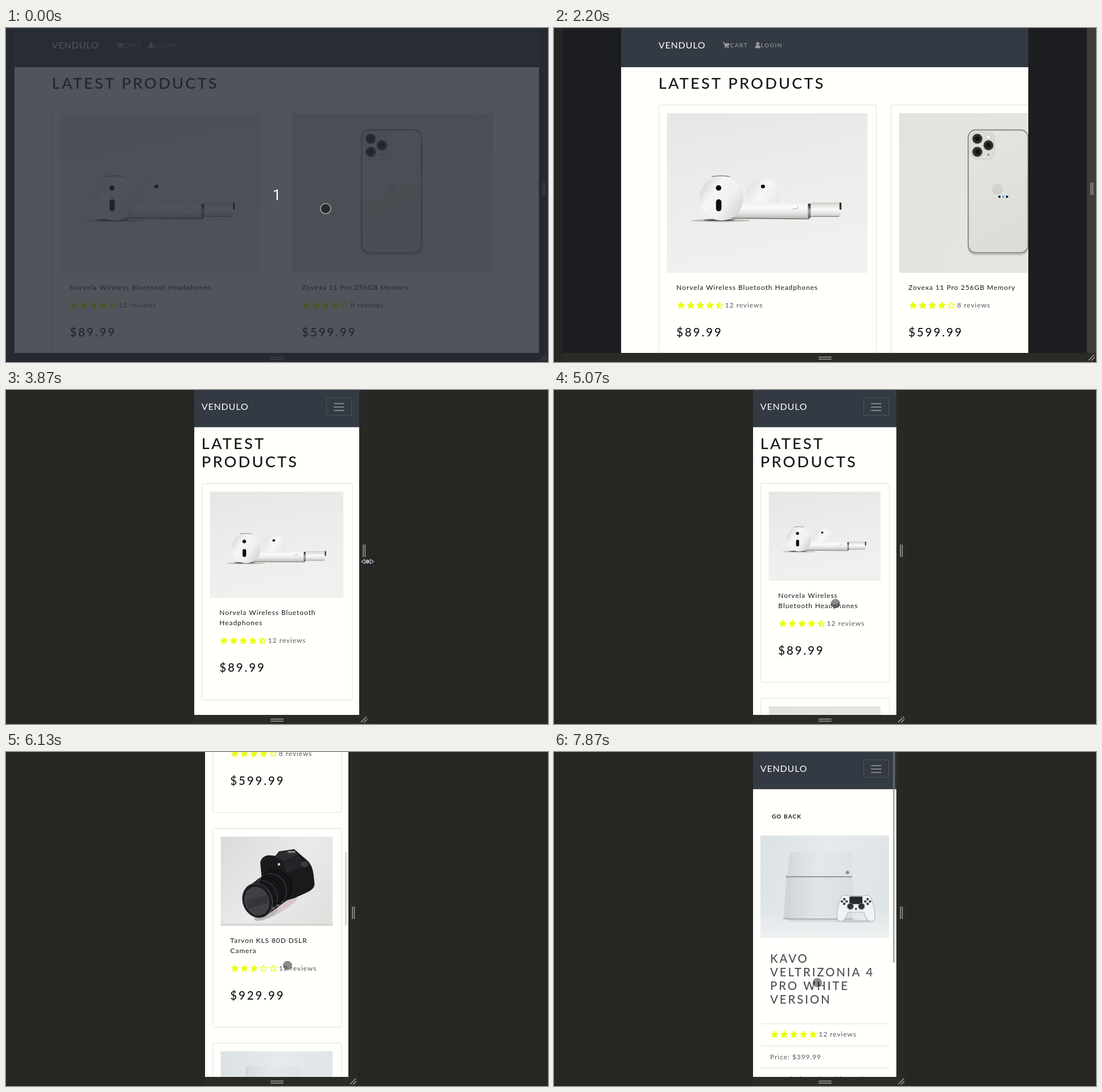
Animation of 953x588 px, one loop 8 s. Source, as an HTML page with a canvas:

```html
<!DOCTYPE html>
<html lang="en">
<head>
<meta charset="utf-8">
<title>Responsive shop</title>
<style>
  html, body { margin: 0; width: 100%; height: 100%; overflow: hidden; background: #262722; }
  canvas { display: block; }
</style>
</head>
<body>
<canvas id="stage" width="953" height="588"></canvas>
<script>
const ctx = document.getElementById('stage').getContext('2d');
const LOOP = 8000, MID = 476, BOTTOM = 572;
const INK = '#161616', GREY = '#55585a', STAR = '#ebff0a', LINE = '#dfdfdc', PAPER = '#fffffc';

// name: weight, size, letter spacing
const styles = {
  h1: [500, 27.2, 3.2], h3: [500, 20.4, 2.9], body: [400, 12, .93],
  brand: [400, 16, .85], link: [500, 10, 1.5], button: [700, 10, 1.1]
};
// title, rating, reviews, price, picture
const products = [
  ['Norvela Wireless Bluetooth Headphones', 4.5, 12, '$89.99', earbuds],
  ['Zovexa 11 Pro 256GB Memory', 4, 8, '$599.99', phone],
  ['Tarvon KLS 80D DSLR Camera', 3, 12, '$929.99', camera],
  ['Kavo Veltrizonia 4 Pro White Version', 5, 12, '$399.99', gameBox],
  ['', 5, 10, '', dusk]
];
// time, visible width, width between handles, layout width
const widths = [
  [0, 922], [2070, 850, 922], [2200, 716, 922], [2330, 610, 716], [2530, 582, 610],
  [2670, 556, 582], [2730, 530, 556], [2870, 490, 530], [3000, 433, 490],
  [3070, 422, 422, 433], [3200, 398, 422], [3270, 372, 422, 398], [3330, 350, 422, 372],
  [3470, 322, 422, 350], [3530, 322], [3670, 308], [3800, 290], [3930, 270],
  [4070, 258], [4130, 254], [4400, 252]
];
const pointer = [
  [0, 562, 318], [200, 562, 318], [730, 759, 331], [1130, 916, 300], [1530, 944, 302],
  [1980, 944, 302], [2200, 790, 297], [2530, 756, 299], [3070, 673, 301], [3670, 654, 302],
  [4130, 612, 302], [4530, 612, 302], [4930, 495, 376], [7150, 495, 376], [7400, 485, 378],
  [7760, 485, 378], [7870, 463, 406]
];
const thumbFade = [[0, 0], [5080, 0], [5150, 1], [5800, 1], [5950, 0], [6070, 0], [6190, 1], [7170, 1], [7400, 0]];

const clamp = x => Math.max(0, Math.min(1, x));
const glide = x => 1 - (1 - x) ** 3 * (1 + 3 * x);
const scrollAt = t => Math.round(757.6 * glide(clamp((t - 5070) / 800)) + 378.9 * glide(clamp((t - 6050) / 670)));

function track(keys, t) {
  const i = keys.findLastIndex(k => k[0] <= t), a = keys[i], b = keys[i + 1] || a;
  const u = a === b ? 0 : (t - a[0]) / (b[0] - a[0]);
  return a.map((v, j) => v + (b[j] - v) * u).slice(1);
}

// --- drawing helpers ---
function paint(fill, stroke, width = 1) {
  if (fill) { ctx.fillStyle = fill; ctx.fill(); }
  if (stroke) { ctx.strokeStyle = stroke; ctx.lineWidth = width; ctx.stroke(); }
}
function box(x, y, w, h, fill, r = 0, stroke, width) {
  ctx.beginPath();
  ctx.roundRect(x, y, w, h, r);
  paint(fill, stroke, width);
}
function oval(x, y, rx, ry, fill, stroke, width, turn = 0) {
  ctx.beginPath();
  ctx.ellipse(x, y, rx, ry, turn, 0, 7);
  paint(fill, stroke, width);
}
function shape(d, fill, stroke, width) {
  const p = new Path2D(d);
  if (fill) { ctx.fillStyle = fill; ctx.fill(p); }
  if (stroke) { ctx.strokeStyle = stroke; ctx.lineWidth = width; ctx.stroke(p); }
}
function fade(x0, y0, x1, y1, ...colors) {
  const g = ctx.createLinearGradient(x0, y0, x1, y1);
  colors.forEach((c, i) => g.addColorStop(i / (colors.length - 1), c));
  return g;
}
function setStyle(name) {
  const [weight, size, gap] = styles[name];
  ctx.font = `${weight} ${size}px Lato, "Open Sans", sans-serif`;
  ctx.letterSpacing = gap + 'px';
  return size;
}
function text(str, x, y, style, color) {
  const size = setStyle(style);
  ctx.fillStyle = color;
  ctx.fillText(str, x, y + size * .36);
}
function wrap(str, max, style) {
  setStyle(style);
  const lines = [];
  for (const word of str.split(' ')) {
    const last = lines.at(-1), joined = last + ' ' + word;
    if (lines.length && ctx.measureText(joined).width <= max) lines[lines.length - 1] = joined;
    else lines.push(word);
  }
  return lines;
}

// --- product pictures ---
function earbuds() {
  box(0, 0, 353, 281, fade(0, 0, 60, 281, '#e6e7e5', '#ecedeb', '#f0f0ee'));
  oval(95, 189, 52, 2.5, '#bdbdba');
  oval(92, 188, 28, 2, '#5a5a58');
  ctx.save();
  ctx.beginPath();
  ctx.rect(130, 100, 80, 59);
  ctx.clip();
  oval(169, 145, 30.5, 30, fade(140, 120, 200, 160, '#dededc', '#f8f8f7', '#e4e4e2'));
  ctx.restore();
  oval(169, 129, 3.6, 3.2, '#111');
  shape('M105 157L250 159V185.500L112 184.500Z', fade(0, 157, 0, 186, '#f1f1f0', '#fafaf9', '#e2e2e0', '#b5b5b2'));
  shape('M112 185L250 186', null, '#6c6c6a', 1.4);
  box(253, 157, 53, 24, fade(0, 157, 0, 181, '#cfcfcc', '#fbfbfa', '#d2d2cf'), 3);
  shape('M253 181.500H303', null, '#777774', 1.2);
  box(248, 159, 5, 26, fade(0, 159, 0, 185, '#222', '#aaa', '#555'), 2);
  box(303.500, 157, 3.500, 13, '#33342f', 2);
  shape('M221 168H230V164', null, '#aaaaa8', 1);
  oval(96, 150, 38.500, 39, fade(58, 120, 134, 172, '#cfcfcd', '#f5f5f4', '#f0f0ef', '#d2d2d0'));
  shape('M79 111.500Q95 109 111 111.500', null, '#8a8a87', 1.6);
  oval(91, 131.500, 4.800, 4.800, '#0e0e0e');
  box(86.500, 151.500, 9.500, 21, '#0e0e0e', 4.700);
}
function phone() {
  box(0, 0, 353, 281, fade(0, 0, 353, 281, '#e2e3df', '#e6e7e3'));
  box(121, 32, 107, 218, '#c3c4bd', 14);
  box(227, 63, 2, 38, '#8b8c84', 1);
  box(122, 29.500, 105, 216, fade(122, 30, 227, 245, '#e4e5e0', '#dbdcd5'), 13, '#85867e', 1.8);
  box(126, 33, 42, 48, '#dcddd7', 11, '#cbccc5', 1);
  oval(173, 134, 10, 10, '#d3d4ce');
  for (const [x, y] of [[138, 45], [157.500, 56.500], [138, 68]]) {
    oval(x, y, 9, 9, '#2b2d2c', '#a7a8a1', 1.2);
    oval(x, y, 4, 4, '#101212');
  }
  oval(157.500, 42, 4, 4, '#f2f2ee', '#b9bab4', 1);
  oval(157.500, 73, 1.600, 1.600, '#65665f');
}
function camera() {
  ctx.scale(353 / 198, 353 / 198);
  box(0, 0, 198, 158, fade(0, 0, 198, 158, '#d9dad9', '#e9eaea', '#dfe0dd'));
  oval(98, 128, 42, 9, '#d6c6cc', null, 0, -.5);
  oval(80, 138, 22, 7, '#bcb4b7', null, 0, -.4);
  box(0, 154, 198, 4, '#d5d6d1');
  shape('M70 46Q72 35 84 33L97 34L103 26L130 22L140 31L153 42Q162 50 164 66L166 84Q166 93 152 99L130 109L104 116L74 88Z', '#191a1c');
  shape('M97 36L104 27L129 24L137 32L112 44Z', '#2c2d30');
  shape('M108 46L138 34L147 50L118 66Z', '#232427');
  box(118, 25, 14, 4, '#77797c', 1);
  oval(148, 49, 7, 5, '#3a3b3e');
  box(101, 47, 4, 4, '#d8d8d8');
  ctx.lineCap = 'round';
  shape('M68 110L101 87', null, '#151618', 55);
  ctx.lineCap = 'butt';
  for (let i = 0; i < 4; i++) oval(74 + i * 8, 107 - i * 6, 26, 30, null, i % 2 ? '#0c0d0e' : '#35363a', 1.6, -.35);
  oval(65, 113, 26, 31, '#1c1d1f', '#5b5c5f', 1, -.35);
  oval(64, 114, 21.500, 26, '#404145', null, 0, -.35);
  shape('M46 112L82 103L84 117L49 128Z', '#35363a');
}
function gameBox() {
  ctx.scale(353 / 198, 353 / 198);
  box(0, 0, 198, 158, fade(0, 0, 198, 60, '#dbe1e4', '#e6eaec', '#dfe4e7'));
  box(0, 117, 198, 41, fade(0, 117, 0, 158, '#e1e6e8', '#eef1f2'));
  shape('M36 128L148 129L156 133L48 133Z', '#d4d9dc');
  shape('M45 26H142V63H40Z', fade(40, 0, 142, 0, '#d5dadd', '#e4e8ea', '#dde2e4'));
  shape('M40 64H142V128H46L36 126Z', fade(36, 0, 142, 0, '#ced4d7', '#e1e5e8', '#d9dee1'));
  shape('M47 27L44 127', null, '#c7cdd1', 1);
  shape('M39 63.500H141', null, '#85898c', 1.6);
  shape('M35 127.500L46 128.500H142', null, '#9da2a5', 1.4);
  oval(134, 57, 2.600, 2.600, '#868c91');
  oval(147, 132, 28, 2, '#c3c9cc');
  shape('M124 95Q128 90 135 93H159Q166 90 170 95Q175 108 176 122Q177 134 169 132Q163 131 159 118H135Q131 131 125 132Q117 133 118 122Q119 107 124 95Z', '#f0f2f3', '#b4babd', 1);
  box(137, 94, 20, 11.500, '#25272a', 1.500);
  for (const x of [138.500, 155.500]) oval(x, 109, 4.800, 4.800, '#303236', '#7c8083', 1);
  for (const x of [129, 165])
    for (const [dx, dy] of [[-3.600, 0], [3.600, 0], [0, -3.600], [0, 3.600]]) oval(x + dx, 101.500 + dy, 1.900, 1.900, '#3d4044');
  oval(147, 113, 1.800, 1.800, '#5a5e62');
}
function dusk() {
  box(0, 0, 353, 281, fade(0, 0, 353, 0, '#797a82', '#92919e', '#aaa9b4'));
}
function picture(art, x, y, w) {
  const h = w * .796;
  ctx.save();
  ctx.beginPath();
  ctx.rect(x, y, w, h);
  ctx.clip();
  ctx.translate(x, y);
  ctx.scale(w / 353, w / 353);
  art();
  ctx.restore();
  return y + h;
}

// --- page parts ---
function rating(value, reviews, x, y) {
  ctx.lineJoin = 'round';
  for (let i = 0; i < 5; i++) {
    const cx = x + 8 + i * 16.9, fill = clamp(value - i);
    ctx.beginPath();
    for (let k = 0; k < 10; k++) {
      const r = k % 2 ? 2.9 : 6.1, a = k * Math.PI / 5 - Math.PI / 2;
      ctx.lineTo(cx + r * Math.cos(a), y + .4 + r * Math.sin(a));
    }
    ctx.closePath();
    paint(fill === 1 && STAR, STAR, 1.3);
    if (fill === .5) {
      ctx.save();
      ctx.clip();
      box(cx - 8, y - 8, 8, 16, STAR);
      ctx.restore();
    }
  }
  text(reviews + ' reviews', x + 85.5, y, 'body', GREY);
}
function nav(W, x, wide) {
  box(0, 0, W, wide ? 69 : 65.5, '#343a43');
  text('VENDULO', x, wide ? 30.5 : 29, 'brand', '#fff');
  const soft = '#9a9da2';
  if (wide) {
    const cx = x + 113;
    shape(`M${cx} 26H${cx + 2.5}L${cx + 4.500} 32.500H${cx + 10}`, null, soft, 1.3);
    shape(`M${cx + 3} 27H${cx + 12}L${cx + 10.500} 31.500H${cx + 4}Z`, soft);
    oval(cx + 5, 34.5, 1.2, 1.2, soft);
    oval(cx + 9.5, 34.5, 1.2, 1.2, soft);
    text('CART', cx + 13, 30.5, 'link', soft);
    oval(cx + 61.5, 27.5, 2.8, 2.8, soft);
    box(cx + 57, 30.5, 9, 5, soft, [3, 3, 1, 1]);
    text('LOGIN', cx + 67, 30.5, 'link', soft);
  } else {
    const right = Math.round(W - x) - .5;
    box(right - 44, 14, 44, 30.5, null, 1, 'rgba(255,255,255,.13)', 1);
    for (const y of [24, 30, 36]) box(right - 31, y - .8, 18, 1.6, '#97999d');
  }
}
function card([title, stars, reviews, price, art], x, y, w) {
  const left = Math.round(x) + .5, tx = x + 31.6;
  const lines = wrap(title, w - 63, 'body'), extra = 18 * (lines.length - 1);
  const base = picture(art, x + 14.6, y + 14.5, w - 29.4), end = Math.round(base + 161.4 + extra) - .5;
  box(left, y, Math.round(w) - .5, end - y, null, 3, LINE, 1);
  lines.forEach((s, i) => text(s, tx, base + 26 + i * 18, 'body', INK));
  rating(stars, reviews, tx, base + 57 + extra);
  text(price, tx, base + 105 + extra, 'h3', INK);
  return end;
}
function shop(W) {
  const wide = W >= 843, cols = W >= 653 ? 2 : 1;
  const room = wide ? 816 : W >= 653 ? 612 : W >= 490 ? 459 : W;
  const x = (W - room) / 2 + 12.75, inner = room - 25.5, head = wide ? 69 : 65.5;
  nav(W, x, wide);
  const lines = wrap('LATEST PRODUCTS', inner, 'h1');
  lines.forEach((s, i) => text(s, x, head + 28.5 + i * 32, 'h1', INK));
  let top = Math.floor(head + 66.5) + .5 + 32 * (lines.length - 1);
  const w = (inner - 25.5 * (cols - 1)) / cols;
  products.forEach((p, i) => {
    const end = card(p, x + (i % cols) * (w + 25.5), top, w);
    if (i % cols === cols - 1) top = end + 28;
  });
}
function detail(W, loaded) {
  const [title, stars, reviews, price, art] = products[3];
  nav(W, 12.75, false);
  text('GO BACK', 33, 113, 'button', INK);
  if (!loaded) return;
  picture(art, 12.75, 147, W - 25.5);
  wrap(title.toUpperCase(), W - 59, 'h3').forEach((s, i) => text(s, 30, 363.5 + i * 24, 'h3', '#4c4e51'));
  for (const y of [478, 517, 556]) box(12.75, y, W - 25.5, 1, LINE);
  rating(stars, reviews, 30, 497);
  text('Price: ' + price, 30, 536.5, 'body', GREY);
  text('Description: The ultimate home', 30, 575.5, 'body', GREY);
}
function page(t, view, W) {
  const scroll = scrollAt(t), left = t >= 7670;
  ctx.save();
  ctx.translate(MID - view / 2, 0);
  ctx.beginPath();
  ctx.rect(0, 0, view, BOTTOM);
  ctx.clip();
  box(0, 0, view, BOTTOM, PAPER);
  ctx.save();
  if (left) detail(W, t >= 7730);
  else { ctx.translate(0, -scroll); shop(W); }
  ctx.restore();
  const alpha = left ? +(t >= 7730) : track(thumbFade, t)[0];
  box(view - 6, left ? 0 : Math.max(0, scroll * .2265 - 2), 3, left ? 371 : 130.5, `rgba(128,128,128,${.62 * alpha})`, 1.5);
  ctx.restore();
}
function frame(span, lit) {
  const L = MID - span / 2, R = MID + span / 2, grip = '#a9a9a5';
  box(0, 0, 953, 588, '#262722');
  box(L, 0, span, BOTTOM, '#1c1d21');
  box(L, BOTTOM, span + 17, 16, '#2a2b27');
  box(R, 0, 17, BOTTOM, lit ? '#3d3e38' : '#282924');
  for (const x of [6.5, 9.7]) box(R + x, 272, 1.4, 22, grip);
  for (const y of [578.7, 582.3]) box(465, y, 23, 1.4, grip);
  shape(`M${R + 3} 585L${R + 13} 575M${R + 8} 585.500L${R + 14} 579.500`, null, grip, 1.4);
}
function drawPointer(t) {
  const [x, y] = track(pointer, t);
  if (t < 1400 || t >= 4600) {
    oval(x, y, 8.3, 8.3, 'rgba(0,0,0,.46)');
    oval(x, y, 9, 9, null, 'rgba(255,255,255,.5)', 1.6);
    return;
  }
  ctx.lineJoin = 'round';
  for (const s of [-1, 1]) {
    const d = `M${x + 10 * s} ${y}L${x + 5 * s} ${y - 3}V${y + 3}Z`;
    shape(d, null, '#fff', 2);
    shape(d, '#0c0c0c');
  }
  oval(x, y, 2.4, 2.8, '#4a9be6', '#fff', 1);
}
function countdown(t) {
  const a = 1 - clamp((t - 40) / 690);
  if (!a) return;
  box(0, 0, 953, 588, `rgba(38,42,51,${.8 * a})`);
  ctx.font = '400 26px Roboto, sans-serif';
  ctx.letterSpacing = '0px';
  ctx.fillStyle = `rgba(255,255,255,${a})`;
  ctx.textAlign = 'center';
  ctx.fillText('1', 476, 303);
  ctx.textAlign = 'left';
}

function draw(now) {
  const t = now % LOOP;
  const [, view, span = view, W = span] = widths.findLast(w => w[0] <= t);
  frame(span, (t >= 1400 && t < 2330) || (t >= 4130 && t < 5070));
  page(t, view, W);
  countdown(t);
  drawPointer(t);
}
const start = performance.now();
function tick() {
  draw(performance.now() - start);
  requestAnimationFrame(tick);
}
tick();
</script>
</body>
</html>
```
